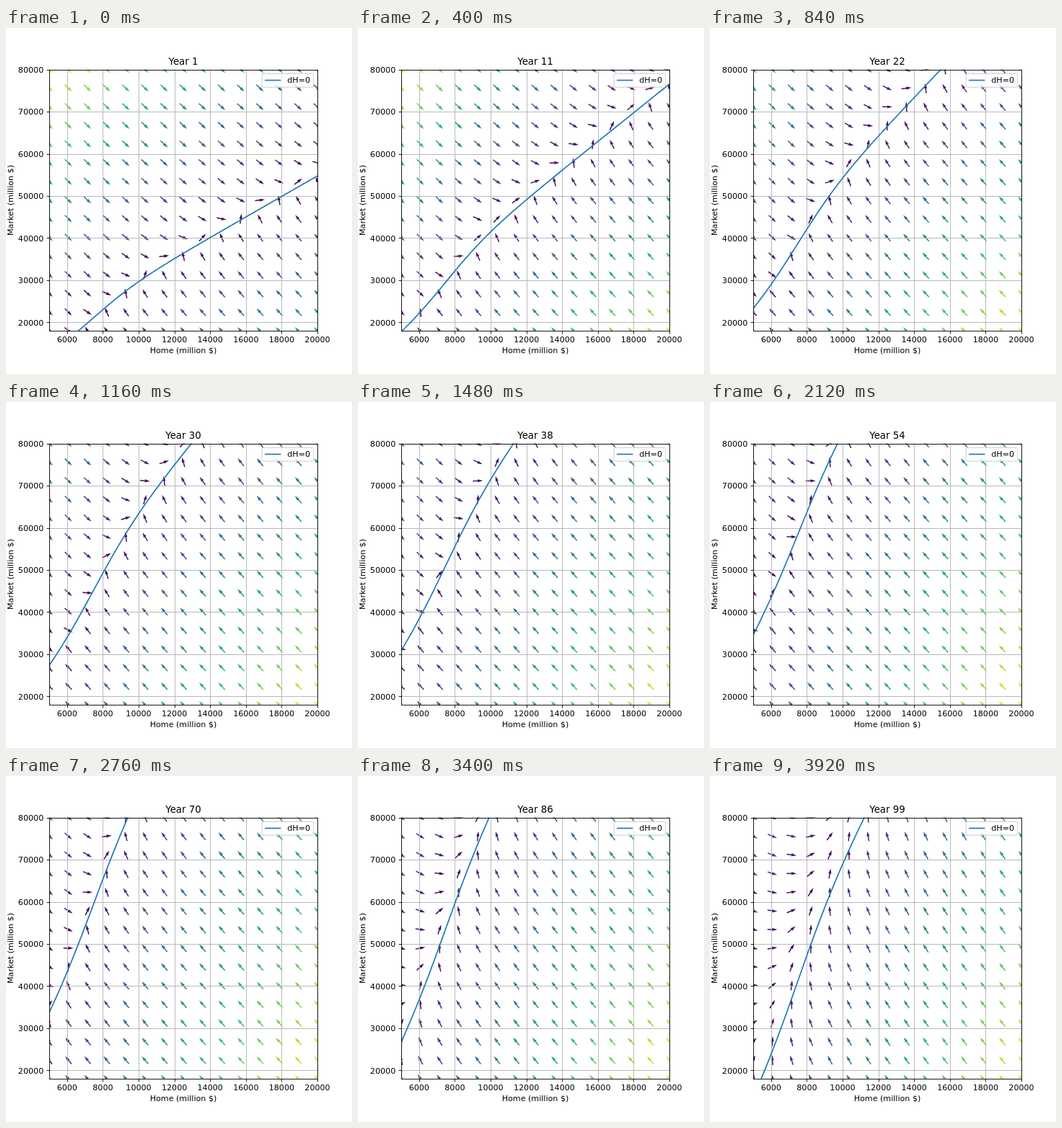
Recreate the animation shown at these times as an HTML page with a canvas. Size 480x480 px, loop 4040 ms.

```html
<!DOCTYPE html>
<html>
<head>
<meta charset="utf-8">
<title>Phase plot</title>
<style>
  html, body { margin: 0; width: 100%; height: 100%; overflow: hidden; background: #fff; }
  canvas { display: block; }
</style>
</head>
<body>
<canvas id="plot" width="480" height="480"></canvas>
<script>
const ctx = document.getElementById('plot').getContext('2d');
const LEFT = 60, RIGHT = 432, TOP = 57.6, BOTTOM = 420;
const H0 = 5, H1 = 20, M0 = 18, M1 = 80;   // axis limits, thousands
const CELLS = 14, YEARS = 99, STEP = 40, LOOP = 4040;
const VIRIDIS = ['440154', '482475', '414487', '355f8d', '2a788e', '21918c',
  '22a884', '44bf70', '7ad151', 'bddf26', 'fde725']
  .map(hex => [0, 2, 4].map(i => parseInt(hex.slice(i, i + 2), 16)));

// year, nullcline steepness, nullcline height, growth gained at high H, base growth
const KEYS = [
  [1, 3.69, 21.17, 2.3, 0],
  [22, 6.74, 38.75, 4.6, 0],
  [38, 8.83, 51.15, 5.3, 0.2],
  [54, 10.41, 58.5, 6, 0.8],
  [70, 11.3, 59.7, 6.4, 4.25],
  [86, 11.76, 53.75, 5.5, 13.2],
  [99, 12.04, 41.26, 5, 28]
];

const px = h => LEFT + (h - H0) / (H1 - H0) * (RIGHT - LEFT);
const py = m => BOTTOM - (m - M0) / (M1 - M0) * (BOTTOM - TOP);
const snap = v => Math.floor(v + 0.5) + 0.5;

function slope(k, col) {
  const a = KEYS[Math.max(k - 1, 0)], b = KEYS[Math.min(k + 1, KEYS.length - 1)];
  return (b[col] - a[col]) / (b[0] - a[0]);
}

// Cubic Hermite interpolation of one key column
function param(year, col) {
  let k = 0;
  while (k < KEYS.length - 2 && year > KEYS[k + 1][0]) k++;
  const a = KEYS[k], b = KEYS[k + 1], span = b[0] - a[0];
  const u = (year - a[0]) / span, v = 1 - u;
  return v * v * (1 + 2 * u) * a[col] + u * u * (1 + 2 * v) * b[col]
    + span * u * v * (v * slope(k, col) - u * slope(k + 1, col));
}

function model(year) {
  const [steep, height, gain, base] = [1, 2, 3, 4].map(col => param(year, col));
  return {
    nullcline: h => height + steep * (0.66 * (h - 7.5) + 0.85 * Math.tanh((h - 7.5) / 2.5)),
    growth: h => base + gain * (1 + Math.tanh((h - 7.5) / 1.3)) / 2
  };
}

function viridis(v) {
  const x = Math.min(Math.max(v, 0), 1) * 10, i = Math.min(Math.floor(x), 9);
  const rgb = VIRIDIS[i].map((c, n) => Math.round(c + (VIRIDIS[i + 1][n] - c) * (x - i)));
  return `rgb(${rgb})`;
}

function arrow(x, y, angle, color) {
  const w = 1.488, len = 13.78, tip = len / 2;
  ctx.save();
  ctx.translate(x, y);
  ctx.rotate(angle);
  ctx.beginPath();
  ctx.moveTo(tip, 0);
  ctx.lineTo(tip - 5 * w, 1.5 * w);
  ctx.lineTo(tip - 4.5 * w, w / 2);
  ctx.lineTo(-tip, w / 2);
  ctx.lineTo(-tip, -w / 2);
  ctx.lineTo(tip - 4.5 * w, -w / 2);
  ctx.lineTo(tip - 5 * w, -1.5 * w);
  ctx.fillStyle = color;
  ctx.fill();
  ctx.restore();
}

function line(points, color, width) {
  ctx.beginPath();
  points.forEach(p => ctx.lineTo(...p));
  ctx.strokeStyle = color;
  ctx.lineWidth = width;
  ctx.stroke();
}

function text(str, x, y, align = 'center', size = 11.11) {
  ctx.font = `${size}px "DejaVu Sans", sans-serif`;
  ctx.textAlign = align;
  ctx.fillStyle = '#000';
  ctx.fillText(str, x, y);
}

function drawField({ nullcline, growth }) {
  const arrows = [];
  for (let i = 0; i <= CELLS; i++) {
    for (let j = 0; j <= CELLS; j++) {
      const h = H0 + (H1 - H0) * i / CELLS, m = M0 + (M1 - M0) * j / CELLS;
      const dH = m - nullcline(h), dM = growth(h) - dH;
      arrows.push({ x: px(h), y: py(m), angle: Math.atan2(-dM, dH), size: Math.hypot(dH, dM) });
    }
  }
  const sizes = arrows.map(a => a.size);
  const low = Math.min(...sizes), high = Math.max(...sizes);
  for (const a of arrows) arrow(a.x, a.y, a.angle, viridis((a.size - low) / (high - low)));
}

function drawAxes() {
  for (let h = 6; h <= H1; h += 2) {
    const x = snap(px(h));
    line([[x, TOP], [x, BOTTOM]], '#b0b0b0', 0.89);
    line([[x, 420.5], [x, 424.4]], '#000', 0.89);
    text(h * 1000, px(h), 436);
  }
  for (let m = 20; m <= M1; m += 10) {
    const y = snap(py(m));
    line([[LEFT, y], [RIGHT, y]], '#b0b0b0', 0.89);
    line([[56.6, y], [60.5, y]], '#000', 0.89);
    text(m * 1000, 52.2, py(m) + 4.2, 'right');
  }
}

function drawLegend() {
  ctx.beginPath();
  ctx.roundRect(355.2, 63.4, 71.3, 18.7, 2.2);
  ctx.fillStyle = 'rgba(255,255,255,.8)';
  ctx.fill();
  ctx.strokeStyle = 'rgba(204,204,204,.8)';
  ctx.lineWidth = 1.11;
  ctx.stroke();
  line([[359.1, 72.5], [381.3, 72.5]], '#1f77b4', 1.67);
  text('dH=0', 390.3, 76, 'left');
}

function draw(year) {
  const state = model(year);
  ctx.fillStyle = '#fff';
  ctx.fillRect(0, 0, 480, 480);

  const clipped = paint => {
    ctx.save();
    ctx.beginPath();
    ctx.rect(LEFT, TOP, RIGHT - LEFT, BOTTOM - TOP);
    ctx.clip();
    paint();
    ctx.restore();
  };
  clipped(() => drawField(state));
  drawAxes();
  clipped(() => {
    const curve = [];
    for (let h = H0; h <= H1; h += 0.1) curve.push([px(h), py(state.nullcline(h))]);
    curve.push([RIGHT, py(state.nullcline(H1))]);
    line(curve, '#1f77b4', 1.67);
  });
  ctx.strokeStyle = '#000';
  ctx.lineWidth = 0.89;
  ctx.strokeRect(60.5, 58.5, 372, 362);
  drawLegend();

  text('Year ' + year, 246, 51, 'center', 13.33);
  text('Home (million $)', 246, 451);
  ctx.save();
  ctx.translate(10.3, 239);
  ctx.rotate(-Math.PI / 2);
  text('Market (million $)', 0, 0);
  ctx.restore();
}

function tick() {
  const t = performance.now() % LOOP;
  draw(Math.min(Math.floor(t / STEP) + 1, YEARS));
  requestAnimationFrame(tick);
}
tick();
</script>
</body>
</html>
```
